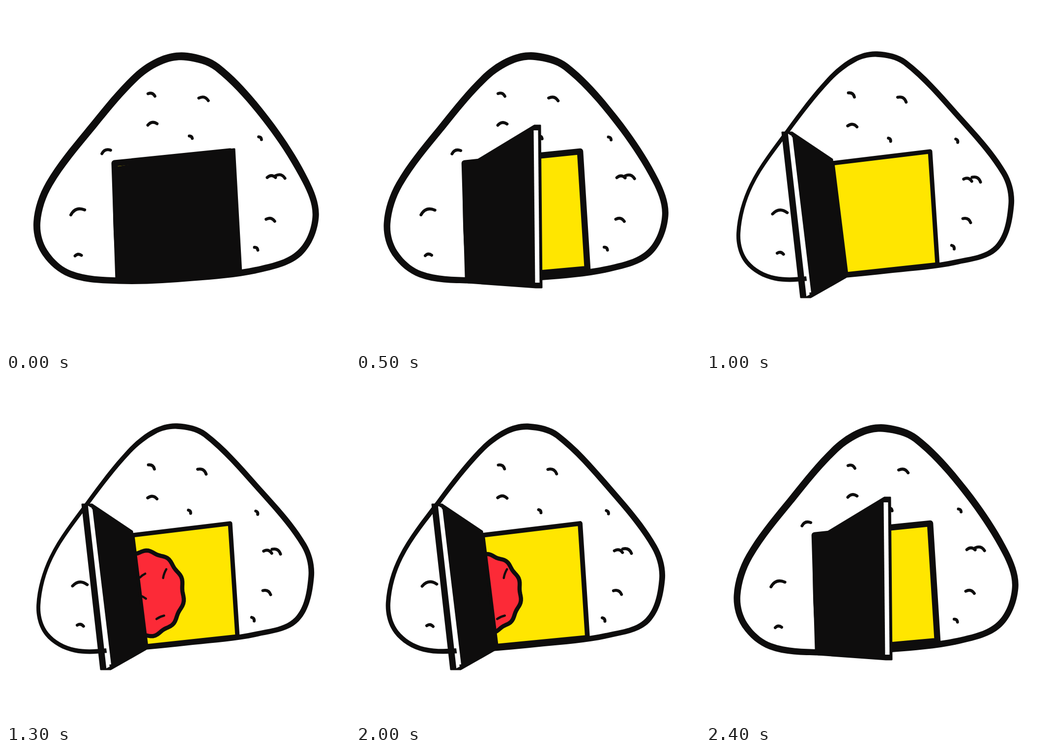
These frames come from a looping animation (700x700 px, 2.5 s). An HTML page:

```html
<!DOCTYPE html>
<html lang="en">
<head>
<meta charset="utf-8">
<title>Rice ball with a door</title>
<style>
html, body { margin: 0; width: 100%; height: 100%; overflow: hidden; background: #fff; }
svg { display: block; width: 100vw; height: 100vh; }
.ink { fill: #0e0d0d; stroke: #0e0d0d; }
.line { fill: none; stroke: #0e0d0d; }
</style>
</head>
<body>
<svg viewBox="0 0 700 700" stroke-linecap="round" stroke-linejoin="round">
  <clipPath id="opening"><path id="hole"/></clipPath>
  <path id="outer" fill="#0e0d0d"/>
  <path id="inner" fill="#fff"/>
  <path id="grains" class="line" stroke-width="6"/>
  <path id="window" fill="#ffe600"/>
  <g clip-path="url(#opening)">
    <path id="ball" fill="#fc2a37" stroke="#0e0d0d" stroke-width="8.5"/>
    <path id="flecks" class="line" stroke-width="4.5"/>
  </g>
  <path id="frame" class="line"/>
  <path id="door" class="ink" stroke-width="3"/>
  <path id="strip" fill="none" stroke="#fff" stroke-linecap="butt"/>
</svg>
<script>
const LOOP = 2500, STEP = 100;
const $ = id => document.getElementById(id);
const points = text => text.split(' ').map(p => p.split(',').map(Number));

// Centre line of the rice, clockwise from the top; ink is its width at top, right, bottom, left.
const closedRice = {
  line: points('368,103 430,125 528,229 610,357 630,430 598,502 520,535 380,553 230,559 130,545 78,500 63,440 88,362 180,240 265,144 318,110'),
  ink: [16, 13, 13, 14.5] };
const openRice = {
  line: points('348,98 405,115 513,224 606,340 621,405 592,491 510,521 380,538 235,552 140,554 83,521 66,462 92,365 168,252 250,150 302,109'),
  ink: [11.5, 11.5, 9.5, 7.5] };

// x, y, length, angle
const grains = points('296,181,15,20 402,190,20,15 298,241,19,-9 376,267,8,40 517,269,8,45 540,349,17,0 558,348,20,15 538,436,18,13 509,494,9,40 204,297,19,-22 146,420,30,-20 147,508,13,-5');
const flecks = points('-5,-37,13,-36 40,-41,19,-70 -4,7,13,28 31,48,17,-24');

// Hinge and free edge of the door, each from top to bottom; stretch reshapes the rice.
const door = (stretch, hinge, edge, thick, strip, shift) =>
  ({ stretch, hinge: points(hinge), edge: points(edge), thick, strip, shift });
const shut = door(0, '221,329 229,563', '464,291 478,543', 2, 0, 0);
const ajar = door(.1, '221,329 228,563', '369,243 372,573', 12, 9, -3);
const edgeOn = door(.25, '219,316 239,556', '246,227 273,575', 18, 11, 0);
const open = door(1, '257,312 285,552', '165,257 203,593', 20, 6, 8);
const closing = { ...open, stretch: .8 };

const ball = (x, rx, ry) => ({ x, rx, ry });
const hidden = ball(160, 71, 79), peek = ball(264, 71, 79);

const swing = [[0, shut], [300, shut], [500, ajar], [700, edgeOn], [900, open],
  [1600, open], [2000, closing], [2200, edgeOn], [2400, ajar], [LOOP, shut]];
const filling = [[0, hidden], [900, hidden], [1300, ball(283, 78, 86)],
  [1600, ball(283, 90, 88)], [2000, peek], [2200, hidden], [LOOP, hidden]];

function mix(a, b, k) {
  if (typeof a === 'number') return a + (b - a) * k;
  if (Array.isArray(a)) return a.map((v, i) => mix(v, b[i], k));
  return Object.fromEntries(Object.keys(a).map(key => [key, mix(a[key], b[key], k)]));
}

function at(track, t) {
  const i = track.findIndex(key => key[0] > t);
  const [[t0, a], [t1, b]] = [track[i - 1], track[i]];
  return mix(a, b, (t - t0) / (t1 - t0));
}

const polygon = pts => 'M' + pts.join('L') + 'Z';

function tangent(pts, i) {
  const n = pts.length, a = pts[(i + n - 1) % n], b = pts[(i + 1) % n];
  const x = b[0] - a[0], y = b[1] - a[1], size = Math.hypot(x, y);
  return [x / size, y / size];
}

function smooth(pts) {
  return 'M' + pts[0] + pts.map((p, i) => {
    const j = (i + 1) % pts.length, q = pts[j];
    const reach = Math.hypot(q[0] - p[0], q[1] - p[1]) / 3;
    const u = tangent(pts, i), v = tangent(pts, j);
    return `C${p[0] + u[0] * reach},${p[1] + u[1] * reach} ${q[0] - v[0] * reach},${q[1] - v[1] * reach} ${q}`;
  }).join('') + 'Z';
}

function offset({ line, ink }, side) {
  return line.map(([x, y], i) => {
    const [tx, ty] = tangent(line, i);
    const q = i * 4 / line.length, k = Math.floor(q);
    const r = side * mix(ink[k], ink[(k + 1) % 4], q - k) / 2;
    return [x + ty * r, y - tx * r];
  });
}

function dash(x, y, length, degrees, bend) {
  const a = degrees * Math.PI / 180;
  const dx = Math.cos(a) * length / 2, dy = Math.sin(a) * length / 2;
  return `M${x - dx},${y - dy}Q${x + dy * 2 * bend},${y - dx * 2 * bend} ${x + dx},${y + dy}`;
}

// Grains sink and turn a little as the rice stretches.
const grain = stretch => ([x, y, length, angle]) => dash(
  x - stretch * .03 * (x - 290),
  y + stretch * 6 * Math.sin((y - 180) / 85),
  length, angle + stretch * 15, .45);

function bumpy({ x, rx, ry }) {
  return Array.from({ length: 110 }, (_, i) => {
    const a = i / 110 * 2 * Math.PI, r = 1 - .025 * Math.cos(11 * (a + .09));
    return [x + rx * r * Math.cos(a), 439 + ry * r * Math.sin(a)];
  });
}

const set = (id, d) => $(id).setAttribute('d', d);
const setWidth = (id, w) => $(id).setAttribute('stroke-width', w);

function drawDoor({ hinge: [h0, h1], edge: [e0, e1], thick, strip, shift }) {
  const side = ([x, y], dx, dy = 0) => [x + dx, y + dy];
  const bow = [(h0[0] + h1[0]) / 2 - 10, (h0[1] + h1[1]) / 2];
  const slab = [side(e0, -thick / 2), side(e0, thick / 2), side(e1, thick / 2), side(e1, -thick / 2)];
  // The face meets the far side of the slab on whichever side the hinge lies.
  set('door', `M${h0}L${e0}L${e1}L${h1}Q${bow} ${h0}Z` + polygon(slab)
    + polygon([h0, slab[h0[0] < e0[0] ? 0 : 1], slab[h0[0] < e0[0] ? 3 : 2], h1]));
  set('strip', `M${side(e0, shift, 10)}L${side(e1, shift, -10)}`);
  setWidth('strip', strip);
}

function draw(t) {
  const d = at(swing, t), b = at(filling, t), k = d.stretch;
  const rice = mix(closedRice, openRice, k);
  set('outer', smooth(offset(rice, 1)));
  set('inner', smooth(offset(rice, -1)));
  set('grains', grains.map(grain(k)).join(''));

  const [top, bottom] = d.hinge;
  const opening = polygon([[top[0], 320], [456, 296], [471, 536 - 10 * k], [bottom[0], bottom[1] - 6]]);
  for (const id of ['hole', 'window', 'frame']) set(id, opening);
  setWidth('frame', 13 - 4 * k);

  set('ball', polygon(bumpy(b)));
  set('flecks', flecks.map(([x, y, length, angle]) => dash(b.x + x, 439 + y, length, angle, .1)).join(''));
  drawDoor(d);
}

let start, shown;
function tick(now) {
  start ??= now;
  const t = Math.floor((now - start) % LOOP / STEP) * STEP;
  if (t !== shown) draw(shown = t);
  requestAnimationFrame(tick);
}
draw(0);
requestAnimationFrame(tick);
</script>
</body>
</html>
```
